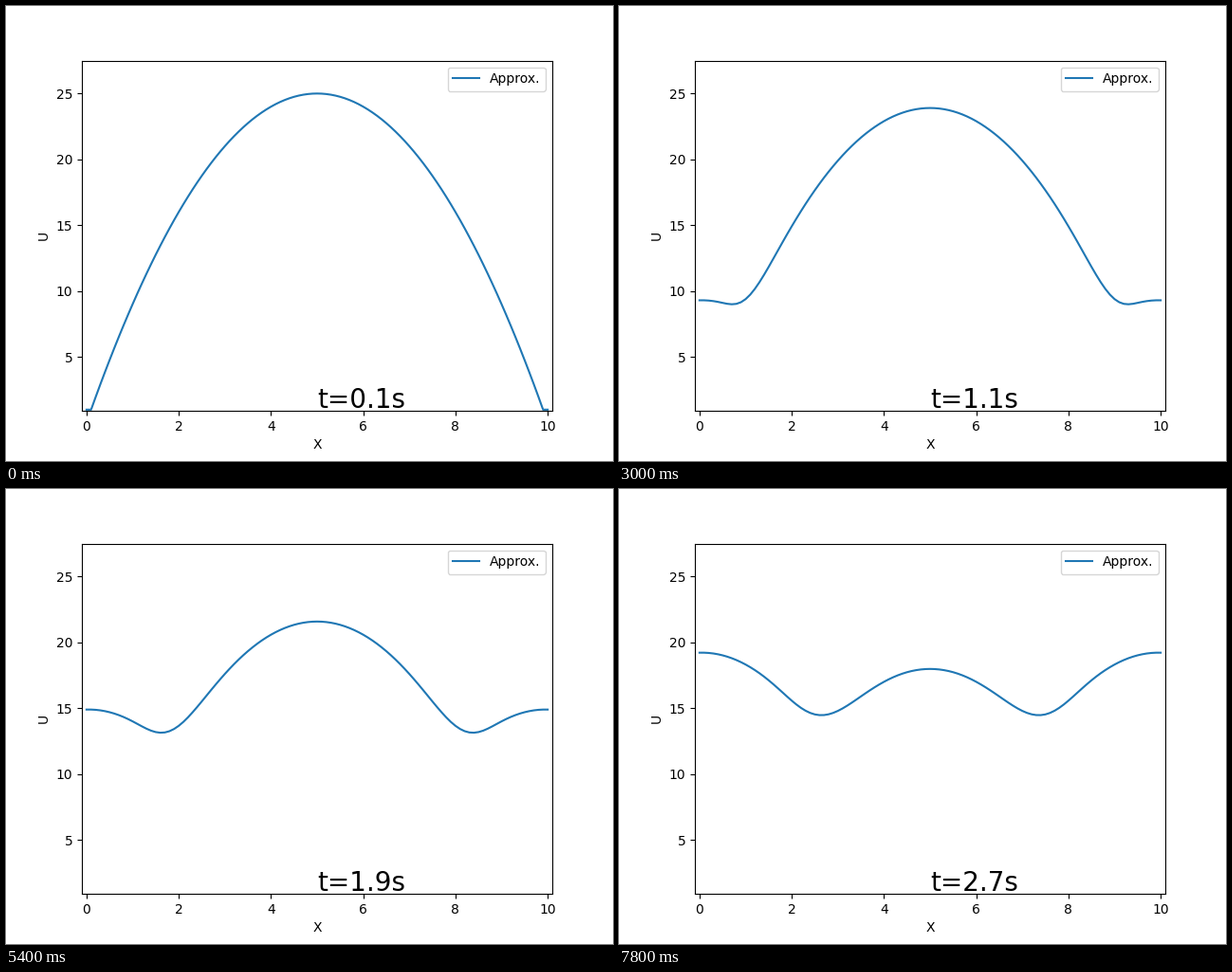
Write a matplotlib script that moves like this. It is 640 px wide and 480 px high and loops after 8 s.

```python
import numpy as np
import matplotlib.pyplot as plt
from matplotlib.animation import FuncAnimation

LENGTH, DX, DT = 10, 0.1, 0.1
STATES = 27
TICK_MS, TICKS, TICKS_PER_STATE = 100, 80, 3

x = np.linspace(0, LENGTH, round(LENGTH / DX) + 1)


def solve_wave():
    """Implicit wave equation u_tt = u_xx with zero-slope ends."""
    inner = len(x) - 2
    r2 = (DT / DX) ** 2
    matrix = ((1 + 2 * r2) * np.eye(inner)
              - r2 * (np.eye(inner, k=1) + np.eye(inner, k=-1)))
    matrix[0, 0] = matrix[-1, -1] = 1 + r2
    step = np.linalg.inv(matrix)

    start = (x * (LENGTH - x))[1:-1]
    states = [start, start]
    while len(states) <= STATES:
        states.append(step @ (2 * states[-1] - states[-2]))
    return [np.pad(u, 1, mode="edge") for u in states[1:]]


waves = solve_wave()

fig, ax = plt.subplots(figsize=(6.4, 4.8), dpi=100)
line, = ax.plot(x, waves[0], label="Approx.")
clock = ax.text(5, 1.1, "", fontsize=20)
ax.set_xlim(-0.1, LENGTH + 0.1)
ax.set_ylim(0.9 * waves[0].min(), 1.1 * waves[0].max())
ax.set_xlabel("X")
ax.set_ylabel("U")
ax.legend(loc="upper right")


def update(tick):
    n = tick // TICKS_PER_STATE
    line.set_ydata(waves[n])
    clock.set_text(f"t={(n + 1) * DT:.1f}s")
    return line, clock


anim = FuncAnimation(fig, update, frames=TICKS, interval=TICK_MS,
                     repeat=True, repeat_delay=0)
plt.show()
```
